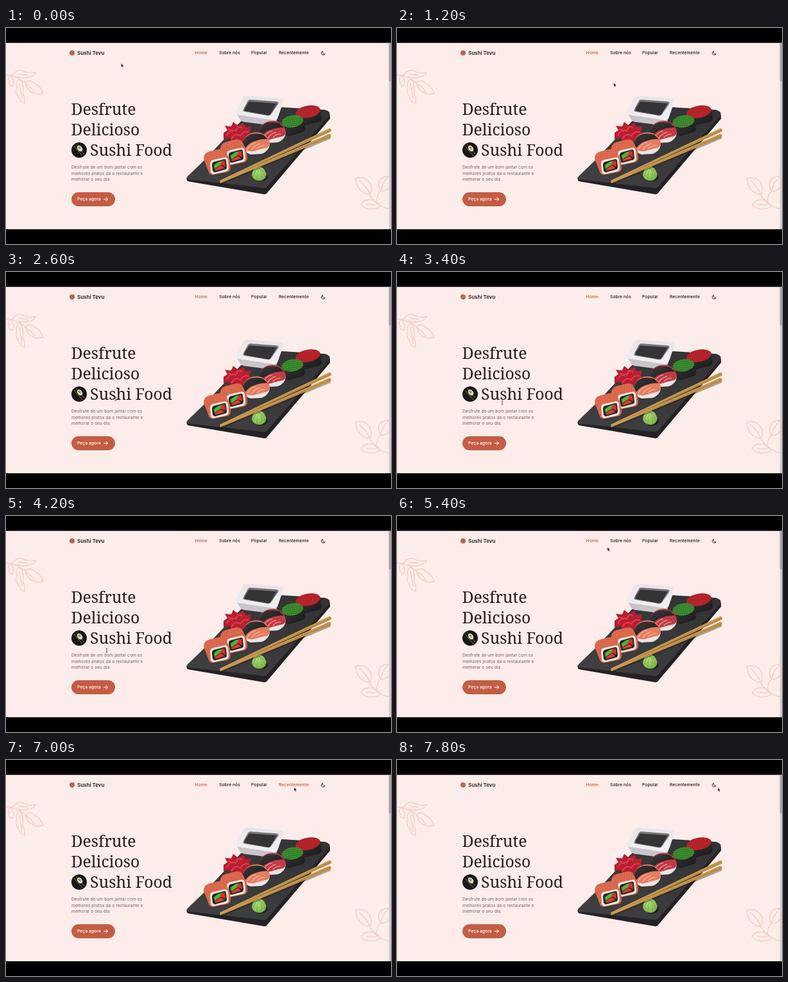
Write an HTML page that moves like this. It is 600x338 px and loops after 8 s.

```html
<!DOCTYPE html>
<html lang="pt">
<head>
<meta charset="utf-8">
<title>Sushi Tevu</title>
<style>
  :root { --ink: #2a1b19; --accent: #c35c43; }
  html, body { margin: 0; width: 100%; height: 100%; overflow: hidden; background: #000; }
  svg { display: block; width: 100vw; height: 100vh; }
  text { font-family: Inter, "Open Sans", sans-serif; fill: var(--ink); }
  .nav text { font-size: 6.8px; font-weight: 500; }
  .nav .on { fill: var(--accent); }
  .title text { font: 24.8px "Noto Serif", serif; }
  .copy text { font-size: 6.75px; fill: #76645f; }
  .leaf { fill: none; stroke: #f4cfc5; stroke-width: 1.5; stroke-linecap: round; stroke-linejoin: round; }

  .popular, .recent, .cursor, .arrow, .beam { animation: 8s step-end infinite; }
  .popular { animation-name: popular; }
  .recent { animation-name: recent; }
  .arrow { animation-name: arrow; }
  .beam { animation-name: beam; }
  .cursor { animation-name: move; }

  @keyframes popular { 0%, 82.5% { fill: var(--ink); } 77.5% { fill: var(--accent); } 80% { fill: #a35341; } }
  @keyframes recent { 0%, 92.5% { fill: var(--ink); } 85% { fill: var(--accent); } }
  @keyframes arrow { 0%, 57.5% { opacity: 1; } 30% { opacity: 0; } }
  @keyframes beam { 0%, 57.5% { opacity: 0; } 30% { opacity: 1; } }
  /* the pointer is sampled every 200 ms = 2.5% */
  @keyframes move {
    0% { transform: translate(179.5px, 55.5px); animation-timing-function: steps(2); }
    5% { transform: translate(322px, 90px); }
    15%, 17.5% { transform: translate(337.8px, 86px); animation-timing-function: steps(6); }
    32.5% { transform: translate(171px, 198.5px); animation-timing-function: steps(8); }
    52.5% { transform: translate(157px, 210.3px); animation-timing-function: steps(6); }
    67.5% { transform: translate(328px, 49px); animation-timing-function: steps(5); }
    80% { transform: translate(410.8px, 42.6px); animation-timing-function: steps(7); }
    97.5%, 100% { transform: translate(500px, 43.3px); }
  }
</style>
</head>
<body>
<svg viewBox="0 0 600 338" preserveAspectRatio="none">
  <defs>
    <linearGradient id="slate" x1="0" y1="1" x2="1" y2="0">
      <stop offset="0" stop-color="#414042"/><stop offset="1" stop-color="#323133"/>
    </linearGradient>
    <linearGradient id="nori" x1="0" y1="0" x2="1" y2="1">
      <stop offset="0" stop-color="#3b393b"/><stop offset="1" stop-color="#171719"/>
    </linearGradient>
    <linearGradient id="china" x1="0" y1="0" x2="0" y2="1">
      <stop offset="0" stop-color="#e6e4e7"/><stop offset="1" stop-color="#f2f0f2"/>
    </linearGradient>
    <linearGradient id="wood" x1="0" y1="1" x2="1" y2="0">
      <stop offset="0" stop-color="#c58f45"/><stop offset="1" stop-color="#b98b45"/>
    </linearGradient>
    <radialGradient id="paste" cx=".4" cy=".35" r=".7">
      <stop offset="0" stop-color="#b4df7d"/><stop offset="1" stop-color="#78b344"/>
    </radialGradient>
    <pattern id="redRoe" width="3.2" height="3" patternUnits="userSpaceOnUse">
      <rect width="4" height="3" fill="#a81a22"/>
      <circle cx="1" cy="1" r=".8" fill="#dc3d43"/><circle cx="2.6" cy="2.4" r=".6" fill="#c92a32"/>
    </pattern>
    <pattern id="greenRoe" width="3" height="3.2" patternUnits="userSpaceOnUse">
      <rect width="3" height="4" fill="#2b7423"/>
      <circle cx="1" cy="1" r=".8" fill="#62b847"/><circle cx="2.4" cy="2.5" r=".6" fill="#459a34"/>
    </pattern>
    <pattern id="orangeRoe" width="2.8" height="2.6" patternUnits="userSpaceOnUse">
      <rect width="3" height="3" fill="#cf553c"/>
      <circle cx=".9" cy=".9" r=".8" fill="#f08c6d"/><circle cx="2.2" cy="2" r=".5" fill="#e67557"/>
    </pattern>
    <g id="roll">
      <path d="M-21-5Q-21-13-13-16L3-20Q11-21 14-15L20-3 21 10Q20 15 15 16L-5 20Q-11 21-13 16Z" fill="url(#orangeRoe)"/>
      <path d="M-11 3Q-11-2-7-3L11-7Q16-8 17-3L18 9Q18 14 14 15L-4 19Q-9 20-10 15Z" fill="#eee5df"/>
      <path d="M-8 5Q-8 1-5 0L10-4Q14-5 14-1L15 8Q15 12 12 12L-2 16Q-6 17-7 13Z" fill="#242720"/>
      <path d="M-5 5L2 0 9-2 5 5-4 11Z" fill="#4fb53a"/>
      <path d="M8-2L12-2 13 8 8 5 4 6Z" fill="#dc2c2c"/>
      <path d="M-4 12L5 6 9 7 11 10-2 14Z" fill="#e03a31"/>
    </g>
    <g id="nigiri">
      <path d="M-18 5Q-18 16-9 18L8 17Q20 13 21 2Z" fill="#e9e4e3"/>
      <path d="M-20 0Q-19-12-6-16Q10-19 18-8Q24 2 18 7Q8 9-5 13Q-19 14-20 0Z" fill="currentColor"/>
      <path d="M-14 10Q-10 1 0-1M-7 11Q-4 4 6 1M1 9Q6 4 13 4" fill="none" stroke="#ffd0bf" stroke-width="1.1" opacity=".75"/>
      <path d="M-20-2Q-17-11-8-14Q3-16 11-13L18-6Q8-7-2-3Q-12 0-17 8Q-21 4-20-2Z" fill="url(#nori)"/>
    </g>
  </defs>

  <rect width="600" height="338"/>
  <rect y="23.3" width="597" height="291.5" fill="#fcedea"/>
  <rect y="314" width="597" height=".8" fill="#f5e3c5"/>
  <rect x="596.7" y="23.3" width="3.3" height="291.5" fill="#d2cbca"/>
  <rect x="596.7" y="23.3" width="3.3" height="60" fill="#aaa4a3"/>

  <g class="leaf">
    <path d="M0 73Q24 76 45 100M10 74Q17 64 26 67Q32 71 46 70Q44 76 35 77Q25 80 18 76"/>
    <path d="M30 86Q38 79 45 87Q54 91 58 102Q50 105 43 102Q34 98 30 86"/>
    <path d="M22 79Q14 85 17 94Q13 101 20 108Q21 116 29 118Q30 109 26 103Q29 91 22 79"/>
    <path d="M7 74Q1 78 5 84Q3 89 10 91Q15 84 7 74M20 72L34 74M21 87L25 111"/>
  </g>
  <g class="leaf">
    <path d="M597 283Q577 279 567 261Q563 249 551 239M567 261Q546 257 545 235Q560 231 567 243Q572 252 567 261"/>
    <path d="M578 276Q576 261 584 255Q587 240 597 233M584 255Q577 245 584 236Q590 232 597 232M584 255Q592 257 597 249"/>
    <path d="M583 279Q576 267 565 269Q557 269 553 277Q563 285 571 283Q578 283 583 279M562 276L576 277"/>
  </g>

  <circle cx="103" cy="39" r="4" fill="#b9664f"/>
  <text x="111" y="41.6" font-size="8" font-weight="600">Sushi Tevu</text>
  <g class="nav">
    <text class="on" x="294.6" y="41.3">Home</text>
    <text x="332" y="41.3">Sobre nós</text>
    <text class="popular" x="382" y="41.3">Popular</text>
    <text class="recent" x="425" y="41.3">Recentemente</text>
  </g>
  <path d="M493.8 36.2A3 3 0 1 0 497.2 40.2A2.7 2.7 0 0 1 493.8 36.2Z" fill="none" stroke="#2a1b19" stroke-width=".9" stroke-linejoin="round"/>

  <g class="title">
    <text x="101.5" y="136">Desfrute</text>
    <text x="101.5" y="168">Delicioso</text>
    <text x="131" y="200">Sushi Food</text>
  </g>
  <g>
    <circle cx="114" cy="191" r="12" fill="#171715"/>
    <path d="M106 185L119 200M109 182L122 197" stroke="#8b7149" stroke-width="1"/>
    <ellipse cx="115" cy="188.5" rx="3.6" ry="5.2" transform="rotate(-38 115 188.5)" fill="#dcdccb"/>
    <ellipse cx="114.6" cy="187.5" rx="1.6" ry="2.6" transform="rotate(-38 114.6 187.5)" fill="#7c9c46"/>
  </g>
  <g class="copy">
    <text x="102" y="220">Desfrute de um bom jantar com os</text>
    <text x="102" y="229.5">melhores pratos da o restaurante e</text>
    <text x="102" y="239">melhorar o seu dia.</text>
  </g>
  <rect x="102" y="257" width="68" height="22" rx="11" fill="#c35c43"/>
  <text x="111" y="270.4" font-size="6.8" font-weight="500" style="fill:#fff">Peça agora</text>
  <path d="M152.3 268H158.6M155.8 265.2L158.6 268 155.8 270.8" fill="none" stroke="#fff" stroke-width="1" stroke-linecap="round" stroke-linejoin="round"/>

  <g>
    <path d="M281.5 234L404 248 505 135V142L407 258Q405 261 401 260L284 240Q281 239 281.5 234Z" fill="#232224"/>
    <path d="M366 146L430 124 497 128Q507 131 504 137L407 248Q404 251 400 250L284 237Q280 236 283 232L310 206Z" fill="url(#slate)"/>

    <path d="M358 131L364 142Q366 146 371 147L410 152Q418 153 421 147L432 114Z" fill="#c9c5ca"/>
    <path d="M371 108Q373 105 378 106L428 110Q433 111 432 116L424 139Q422 145 416 144L363 136Q356 134 359 129Z" fill="url(#china)"/>
    <path d="M381 112L422 115Q426 116 424 119L413 135Q411 138 407 137L372 131Q368 130 370 127L377 114Q378 112 381 112Z" fill="#77747a"/>
    <path d="M379 115L422 118 412 135Q410 137 406 136L373 130Q371 129 372 126Z" fill="#343437"/>

    <path d="M339 164L345 160 341 153 351 154 354 147 362 153 370 148 373 155 382 154 380 162 384 168 374 170 369 178 361 174 352 179 349 172 339 174Z" fill="#b81f31"/>
    <path d="M344 168Q350 157 358 161Q363 150 368 157M351 174Q357 163 365 169Q371 160 378 163M347 158L354 162" fill="none" stroke="#de3c4d" stroke-width="2"/>

    <path d="M452 131L457 147Q459 152 466 152L487 147Q493 145 492 139L489 126Z" fill="url(#nori)"/>
    <ellipse cx="470.5" cy="131" rx="19.5" ry="9.5" transform="rotate(-11 470.5 131)" fill="url(#redRoe)"/>
    <path d="M430 147L434 165Q436 170 442 169L462 163Q467 161 466 155L463 143Z" fill="url(#nori)"/>
    <ellipse cx="446.5" cy="146" rx="17" ry="9.5" transform="rotate(-9 446.5 146)" fill="url(#greenRoe)"/>

    <use href="#nigiri" x="415" y="162" color="#c23a45"/>
    <use href="#nigiri" x="390" y="180" color="#e57c5f"/>
    <use href="#roll" x="355" y="194.5"/>
    <use href="#roll" x="329" y="209.5"/>

    <ellipse cx="397" cy="234" rx="11" ry="6" fill="#222123"/>
    <path d="M383 230Q384 220 393 216Q402 217 405.500 228Q406 237 396 239Q385 239 383 230Z" fill="url(#paste)"/>
    <path d="M386 233Q387 222 394 218M391 237Q391 225 395 219M398 237Q399 226 395 220M403 233Q402 224 396 219" fill="none" stroke="#6da83f" stroke-width=".8"/>

    <path d="M335 244L506 172" stroke="#111" stroke-width="2" opacity=".35"/>
    <path d="M333 238.800L504 157Q508 158 506.500 162L334 241Z" fill="url(#wood)"/>
    <path d="M333 240.500L504 165.500Q508 167 506 171L334 243Z" fill="url(#wood)"/>
    <path d="M334 239.200L505 157.800M334 241L505 166.200" stroke="#d9ae66" stroke-width=".8"/>
  </g>

  <g class="cursor">
    <path class="arrow" d="M0 0V5.6L1.3 4.5 2.2 6.5 3.2 6 2.3 4.1H4Z" fill="#0c0c0c" stroke="#fff" stroke-width=".3"/>
    <path class="beam" d="M-1.4-2.8H1.4M0-2.8V2.8M-1.4 2.8H1.4" fill="none" stroke="#443b39" stroke-width=".8"/>
  </g>
</svg>
</body>
</html>
```
